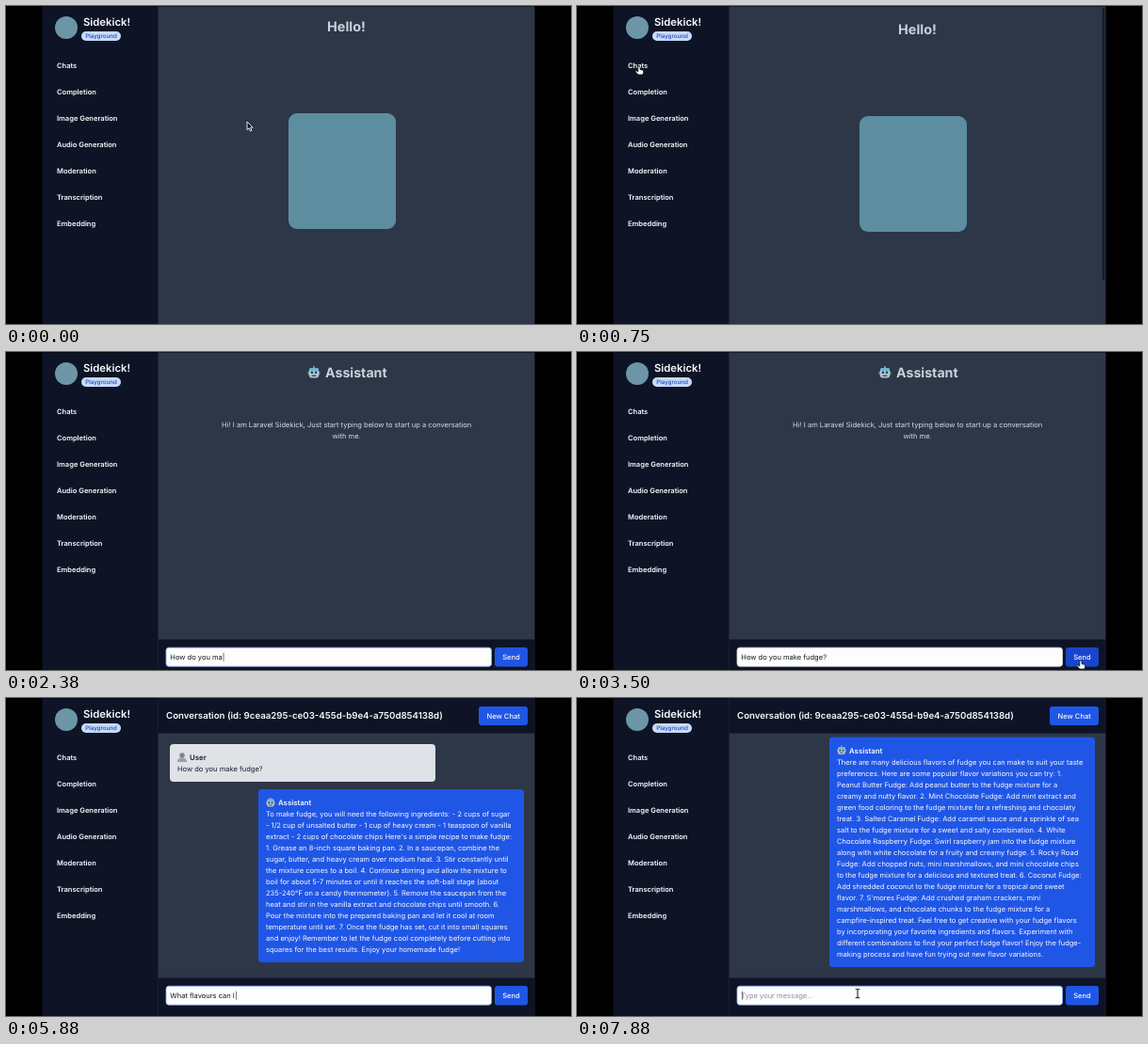
Write an HTML page that moves like this. It is 600x338 px and loops after 8000 ms.

```html
<!DOCTYPE html>
<html lang="en">
<head>
<meta charset="utf-8">
<title>Sidekick playground</title>
<style>
html, body { margin: 0; height: 100%; overflow: hidden; background: #000; }
svg { display: block; width: 100vw; height: 100vh; }
text { font: 7.54px Inter, "Liberation Sans", sans-serif; white-space: pre; text-rendering: geometricPrecision; }
</style>
</head>
<body>
<svg id="stage" viewBox="0 0 600 338"></svg>
<script>
const LOOP = 8000, STEP = 125;
const NAVY = '#0e1426', SLATE = '#2d3748', BLUE = '#2056e6', WHITE = '#f8fafc';
const stage = document.getElementById('stage');

const MENU = ['Chats', 'Completion', 'Image Generation', 'Audio Generation', 'Moderation', 'Transcription', 'Embedding'];

const RECIPE = `To make fudge, you will need the following ingredients: - 2 cups of sugar
- 1/2 cup of unsalted butter - 1 cup of heavy cream - 1 teaspoon of vanilla
extract - 2 cups of chocolate chips Here's a simple recipe to make fudge:
1. Grease an 8-inch square baking pan. 2. In a saucepan, combine the
sugar, butter, and heavy cream over medium heat. 3. Stir constantly until
the mixture comes to a boil. 4. Continue stirring and allow the mixture to
boil for about 5-7 minutes or until it reaches the soft-ball stage (about
235-240°F on a candy thermometer). 5. Remove the saucepan from the
heat and stir in the vanilla extract and chocolate chips until smooth. 6.
Pour the mixture into the prepared baking pan and let it cool at room
temperature until set. 7. Once the fudge has set, cut it into small squares
and enjoy! Remember to let the fudge cool completely before cutting into
squares for the best results. Enjoy your homemade fudge!`;

const FLAVORS = `There are many delicious flavors of fudge you can make to suit your taste
preferences. Here are some popular flavor variations you can try: 1.
Peanut Butter Fudge: Add peanut butter to the fudge mixture for a
creamy and nutty flavor. 2. Mint Chocolate Fudge: Add mint extract and
green food coloring to the fudge mixture for a refreshing and chocolaty
treat. 3. Salted Caramel Fudge: Add caramel sauce and a sprinkle of sea
salt to the fudge mixture for a sweet and salty combination. 4. White
Chocolate Raspberry Fudge: Swirl raspberry jam into the fudge mixture
along with white chocolate for a fruity and creamy fudge. 5. Rocky Road
Fudge: Add chopped nuts, mini marshmallows, and mini chocolate chips
to the fudge mixture for a delicious and textured treat. 6. Coconut Fudge:
Add shredded coconut to the fudge mixture for a tropical and sweet
flavor. 7. S'mores Fudge: Add crushed graham crackers, mini
marshmallows, and chocolate chunks to the fudge mixture for a
campfire-inspired treat. Feel free to get creative with your fudge flavors
by incorporating your favorite ingredients and flavors. Experiment with
different combinations to find your perfect fudge flavor! Enjoy the fudge-
making process and have fun trying out new flavor variations.`;

const PAGES = [875, 3625, 7125];      // when each new page appears
const TYPING = [
  { from: 1500, rate: 66, text: 'How do you make fudge?', page: 1 },
  { from: 4500, rate: 72, text: 'What flavours can I make?', page: 2 }
];
const FOCUS = [0, 1250, 3625, 7750];  // caret blink start per page

// time, x, y of the pointer
const PATH = [
  [0, 256, 123], [380, 256, 123], [750, 66, 64], [875, 66, 64], [1250, 283, 324],
  [2950, 283, 324], [3375, 535, 328], [3700, 535, 328], [4125, 285, 318],
  [6400, 285, 318], [6875, 535, 319], [7250, 535, 319], [7750, 298, 314], [LOOP, 298, 314]
];

const rect = (x, y, w, h, fill, r = 0, extra = '') =>
  `<rect x="${x}" y="${y}" width="${w}" height="${h}" rx="${r}" fill="${fill}" ${extra}/>`;

const text = (s, x, y, fill = WHITE, size = 7.54, weight = 400, anchor = 'start') =>
  `<text x="${x}" y="${y}" fill="${fill}" text-anchor="${anchor}" style="font-size:${size}px;font-weight:${weight}">${s}</text>`;

const lines = (s, x, y, fill) => s.split('\n').map((line, i) => text(line, x, y + 12 * i, fill)).join('');

const at = (x, y, body, scale = 1) => `<g transform="translate(${x} ${y}) scale(${scale})">${body}</g>`;

const ease = p => p * p * (3 - 2 * p);

function pointerAt(t) {
  const i = PATH.findIndex(k => k[0] > t);
  const [t0, x0, y0] = PATH[i - 1], [t1, x1, y1] = PATH[i];
  const p = ease((t - t0) / (t1 - t0));
  return { x: x0 + (x1 - x0) * p, y: y0 + (y1 - y0) * p };
}

const botFace = rect(0, 5, 13, 5, '#8495a6', 2) + rect(1.5, 2, 10, 10.5, '#b4c5d2', 2.5) +
  rect(1.5, 2, 10, 3, '#6cb4d4', 1.5) + rect(5.8, 0, 1.4, 2.5, '#a8b8c4') +
  '<circle cx="4.4" cy="6.8" r="1.3" fill="#26394c"/><circle cx="8.6" cy="6.8" r="1.3" fill="#26394c"/>' +
  rect(4, 9.5, 5, 1.4, '#45596c', .6);

const person = '<circle cx="5" cy="3" r="2.7" fill="#7d8288"/><path d="M0 10q0-4.5 5-4.5t5 4.5z" fill="#9a9fa4"/>';

const CURSORS = {
  arrow: '<path d="M0 0v8.6l2-1.8 1.5 3.2 1.4-.7-1.4-3.1h2.6z" fill="#111" stroke="#e8ebef" stroke-width="1"/>',
  beam: '<path d="M-2.3-4.8q2.3 0 2.3 1.4V3.4q0 1.4-2.3 1.4M2.3-4.8Q0-4.8 0-3.4M2.3 4.8Q0 4.8 0 3.4" fill="none" stroke="#222" stroke-width="1.1"/>',
  hand: '<path d="M-1.2.5Q0-1 1 .5V3.4l3 .9q1 .4.7 1.8L4 9H-1L-4 5.8q0-1.5 1.3-.9L-1.2 6z" fill="#fff" stroke="#111" stroke-width=".8"/>'
};

const sidebar = rect(38.5, .5, 123, 337.5, NAVY) + rect(161, .5, .7, 337.5, '#1d2638') +
  '<circle cx="64" cy="23" r="12" fill="#6c96a5"/>' +
  text('Sidekick!', 82, 21.2, WHITE, 11.3, 600) +
  rect(80, 27, 42, 10, '#c6dbfd', 5) + text('Playground', 101, 34.3, '#2346b0', 6.2, 500, 'middle') +
  MENU.map((name, i) => text(name, 54, 65.8 + 28 * i, WHITE, 7.54, 600)).join('');

function hello(t) {
  const dy = -3 * (1 - Math.min(1, t / 250));
  return at(0, dy, text('Hello!', 361.5, 30.2, '#cbd1da', 14.4, 700, 'middle') +
      rect(300, 117, 114, 123, '#5d8e9f', 9)) +
    (t > 0 ? rect(557.8, 2, 2.6, 289, '#161c27', 1.3) : '');
}

const welcome = at(320.5, 15, botFace) + text('Assistant', 339, 27.3, '#cbd1da', 14.2, 700) +
  text('Hi! I am Laravel Sidekick, Just start typing below to start up a conversation', 361.7, 79.9, '#d8dde4', 7.54, 400, 'middle') +
  text('with me.', 361.7, 91.9, '#d8dde4', 7.54, 400, 'middle');

const header = rect(161.7, .5, 399.8, 37, NAVY) +
  text('Conversation (id: 9ceaa295-ce03-455d-b9e4-a750d854138d)', 170, 22.4, WHITE, 9.68, 600) +
  rect(502, 9, 52, 20, BLUE, 3) + text('New Chat', 528.2, 21.8, WHITE, 7.54, 500, 'middle');

const answer = (y, h, body) => rect(268, y, 282, h, BLUE, 4) + at(276, y + 9, botFace, .76) +
  text('Assistant', 289, y + 17, WHITE, 7.8, 600) + lines(body, 276, y + 29.2, WHITE);

const question = rect(174, 49, 282, 40, '#dfe2e6', 4) + at(182, 58, person) +
  text('User', 195, 66, '#1a202c', 7.8, 600) + text('How do you make fudge?', 182, 78, '#1a202c');

function composer(t, page, overSend) {
  const y = page === 1 ? 305.5 : 297.5;
  const job = TYPING.find(j => j.page === page && t >= j.from);
  const typed = job ? job.text.slice(0, Math.floor((t - job.from) / job.rate)) : '';
  const busy = job && t < job.from + job.rate * job.text.length + 200;
  const focused = t >= FOCUS[page] && (!job || busy);
  const caret = focused && (busy || (t - FOCUS[page]) % 1000 < 500);
  const base = y + 21.3;
  return rect(161.7, y, 399.8, 338 - y, NAVY) +
    rect(170, y + 8.7, 345.5, 20, '#fdfdfe', 3, `stroke="${focused ? '#8db4f7' : '#d3d8df'}" stroke-width=".8"`) +
    (typed ? '' : text('Type your message...', 174.3, base, '#8b929c')) +
    text(typed + (caret ? '|' : ''), 174.3, base, '#15181e') +
    rect(519, y + 8.5, 35, 20.5, overSend ? '#1945cb' : BLUE, 3) +
    text('Send', 536.5, base, WHITE, 7.54, 500, 'middle');
}

function pointer({ x, y }, page) {
  const low = page > 0 && y > 305;
  const kind = x < 161 || (low && x > 519) ? 'hand' : low && x > 170 && x < 515 ? 'beam' : 'arrow';
  return at(x, y, CURSORS[kind]);
}

function draw(t) {
  const page = PAGES.filter(start => t >= start).length;
  const pos = pointerAt(t);
  const hidden = (t >= 1500 && t < 2950) || (t >= 4500 && t < 6400);
  const content = [
    () => hello(t),
    () => welcome,
    () => header + question + answer(97, 184, RECIPE),
    () => header + answer(41.5, 244.5, FLAVORS)
  ][page]();
  stage.innerHTML = rect(0, 0, 600, 338, '#000') + rect(161, .5, 400.5, 337.5, SLATE) + sidebar + content +
    (page ? composer(t, page, pos.x > 519 && pos.y > 300) : '') +
    (hidden ? '' : pointer(pos, page));
}

let shown = -1;
const begin = performance.now();
function tick() {
  const step = Math.floor(((performance.now() - begin) % LOOP) / STEP);
  if (step !== shown) draw((shown = step) * STEP);
  requestAnimationFrame(tick);
}
tick();
</script>
</body>
</html>
```
